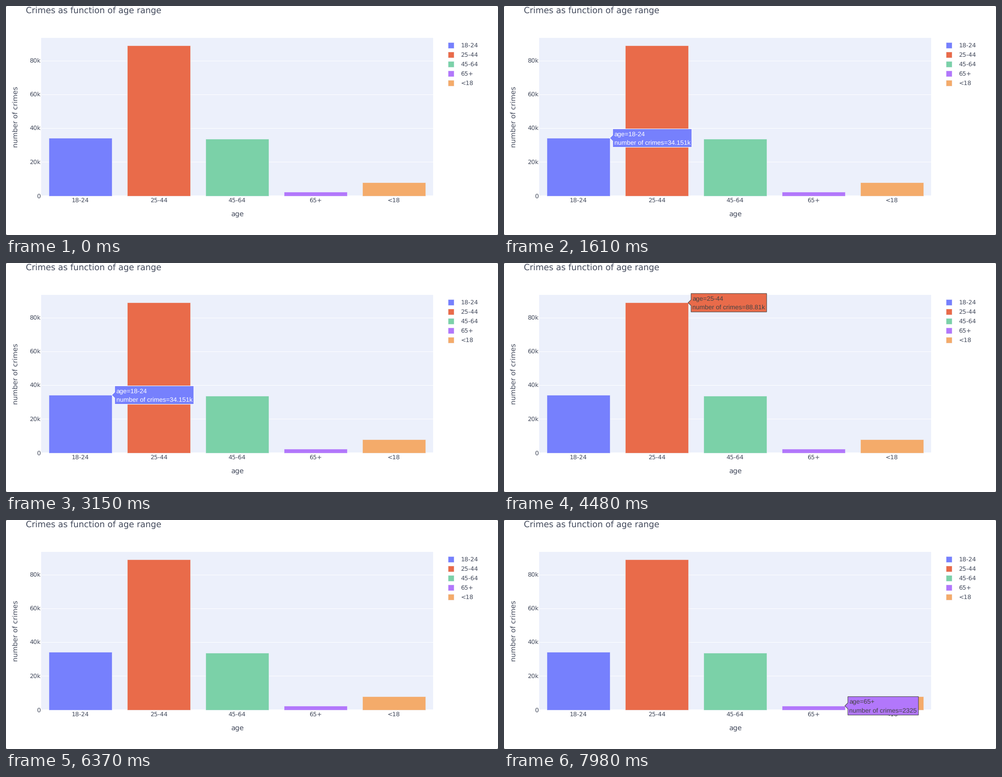
Write a matplotlib script that moves like this. It is 1092 px wide and 510 px high and loops after 8000 ms.

```python
import matplotlib.pyplot as plt
from matplotlib.animation import FuncAnimation
from matplotlib.patches import Polygon, Rectangle

W, H, DPI = 1092, 510, 64
LOOP, STEP = 8000, 50
LEFT, RIGHT, TOP, ZERO = 78, 948, 71, 422.6
PER_K = 3.7625
SLOT = (RIGHT - LEFT) / 5
INK, PLOT_BG, DARK = "#434a5c", "#ecf0fb", "#444444"

# label, thousands, bar colour, hover value, hover colour, shown from / to (ms)
BARS = [
    ("18-24", 34.151, "#7680fd", "34.151k", "white", 1500, 3700),
    ("25-44", 88.81, "#e96b4a", "88.81k", DARK, 3850, 4900),
    ("45-64", 33.612, "#7bd1a8", "33.612k", DARK, 5050, 6220),
    ("65+", 2.325, "#b277fb", "2325", DARK, 6600, LOOP),
    ("<18", 7.85, "#f4ab6a", None, None, 0, 0),
]

plt.rcParams["text.hinting"] = "none"
fig = plt.figure(figsize=(W / DPI, H / DPI), dpi=DPI, facecolor="white")
ax = fig.add_axes([0, 0, 1, 1])
ax.set_xlim(0, W)
ax.set_ylim(H, 0)
ax.axis("off")


def px(size):
    return size * 72 / DPI


def label(x, y, text, size=13.2, color=INK, font="DejaVu Sans", **kw):
    return ax.text(x, y, text, fontsize=px(size), color=color, family=font,
                   va="baseline", **kw)


def box(x, y, w, h, color, edge="none", lw=0.0, z=1):
    ax.add_patch(Rectangle((x, y), w, h, facecolor=color, edgecolor=edge,
                           linewidth=px(lw), zorder=z))


def y_of(thousands):
    return ZERO - thousands * PER_K


def hover(x, y, name, value, fill, line):
    """Hover label pointing left at (x, y)."""
    style = dict(size=14.3, color=line, font="Liberation Sans", zorder=6)
    first = label(x + 9.9, y - 4.3, f"age={name}", **style)
    second = label(x + 9.9, y + 14.7, f"number of crimes={value}", **style)
    x0 = x + 6.6
    x1 = x0 + second.get_window_extent().width + 6.6
    half = 20.5
    shape = Polygon([(x, y), (x0, y - 6.6), (x0, y - half), (x1, y - half),
                     (x1, y + half), (x0, y + half), (x0, y + 6.6)],
                    facecolor=fill, edgecolor=line, linewidth=px(1.1),
                    joinstyle="miter", zorder=5)
    ax.add_patch(shape)
    return [shape, first, second]


# window corners
for cx, sx in ((0, 1), (W, -1)):
    for cy, sy in ((0, 1), (H, -1)):
        ax.add_patch(Polygon([(cx, cy), (cx + 2 * sx, cy), (cx, cy + 2 * sy)],
                             color="#777777", linewidth=0))

box(LEFT, TOP, RIGHT - LEFT, ZERO - TOP, PLOT_BG, z=0)
for k in (0, 20, 40, 60, 80):
    y = y_of(k)
    ax.plot([LEFT, RIGHT], [y, y], color="white", linewidth=px(1.1 if k else 2),
            solid_capstyle="butt", zorder=1 if k else 3)
    label(77, y + 5, f"{k}k" if k else "0", ha="right")

tips = []
for i, (name, count, color, value, line, start, end) in enumerate(BARS):
    mid, y = LEFT + SLOT * (i + 0.5), y_of(count)
    half = SLOT * 0.4
    box(mid - half, y, 2 * half, ZERO - y, color, PLOT_BG, 0.6, z=4)
    label(mid, 437, name, ha="center")
    box(981, 81 + 21 * i, 13, 13, color, PLOT_BG, 0.6)
    label(1009.3, 92.3 + 21 * i, name)
    if value:
        tips.append((start, end, hover(mid + half, y, name, value, color, line)))

label(44, 16, "Crimes as function of age range", 18.7)
label(513, 467.6, "age", 15.4, ha="center")
label(25.5, 247, "number of crimes", 15.4, ha="center", rotation=90,
      rotation_mode="anchor")


def draw(i):
    t = i * STEP
    for start, end, parts in tips:
        for part in parts:
            part.set_visible(start <= t < end)
    return []


anim = FuncAnimation(fig, draw, frames=LOOP // STEP, interval=STEP,
                     repeat=True, repeat_delay=0, blit=False)
plt.show()
```
